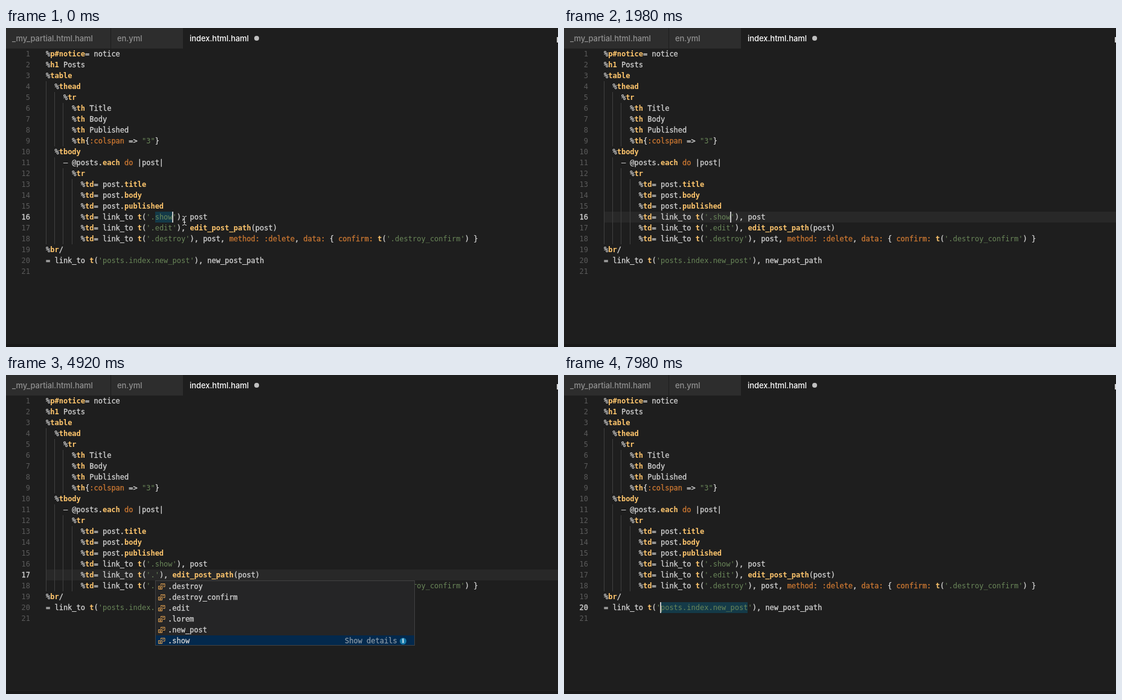
Write an HTML page that moves like this. It is 914 px wide and 528 px high and loops after 8 s.

```html
<!DOCTYPE html>
<html lang="en">
<head>
<meta charset="utf-8">
<title>Editor completion</title>
<style>
  html, body { margin: 0; width: 100%; height: 100%; overflow: hidden; background: #1e1e1e; }
  #stage { position: relative; width: 914px; height: 528px; overflow: hidden; background: #1e1e1e;
    color: #d4d4d4; font: 12px/18px "DejaVu Sans Mono", monospace; white-space: pre; }
  #stage div, #stage svg { position: absolute; }
  .tab { top: 0; height: 34px; background: #2d2d2d; color: #919191; box-sizing: border-box;
    padding-left: 10px; font: 500 13px/34px Inter, sans-serif; letter-spacing: -.05px; }
  .tab.active { background: #1e1e1e; color: #fff; }
  .dot { left: 411px; top: 13px; width: 8px; height: 8px; border-radius: 50%; background: #c0c0c0; }
  .edge { left: 912px; top: 15px; width: 2px; height: 9px; background: #d0d0d0; }
  .foot { left: 0; top: 523px; width: 914px; height: 5px; background: #191919; }
  #code { left: 0; top: 0; }
  .num { left: 0; width: 40px; text-align: right; color: #5a5a5a; }
  .num.on { color: #d0d0d0; -webkit-text-stroke: .3px; }
  .line { left: 66px; -webkit-text-stroke: .3px; }
  .guide { width: 1px; height: 18px; background: #404040; }
  .fn { color: #ffc66d; font-weight: bold; -webkit-text-stroke: 0; }
  .key { color: #cc7832; }
  .str { color: #6a8759; -webkit-text-stroke: 0; }
  #band { left: 66px; width: 848px; height: 18px; background: #282828; }
  #sel, #twin { height: 18px; background: #143a48; }
  #twin { background: #1c2b32; }
  #caret { width: 2px; height: 18px; background: #c4c4c4; }
  #popup { width: 430px; box-sizing: border-box; border: 1px solid #424242; background: #252526; overflow: hidden; }
  .item { left: 0; width: 100%; height: 18px; -webkit-text-stroke: .3px; }
  .item.on { background: #03294d; }
  .item svg { left: 3px; top: 2px; }
  .label { left: 20px; }
  .label b { color: #1a9bfc; }
  .more { left: 313px; color: #8796a3; }
  .info { left: 404px; top: 4px; width: 11px; height: 11px; border-radius: 50%; background: #1679a8;
    color: #cfe6f2; font: bold 9px/11px "DejaVu Serif", "Noto Serif", serif; text-align: center; }
</style>
</head>
<body>
<div id="stage">
  <div class="tab" style="left:0;width:173px">_my_partial.html.haml</div>
  <div class="tab" style="left:174px;width:119px">en.yml</div>
  <div class="tab active" style="left:294px;width:146px">index.html.haml</div>
  <div class="dot"></div>
  <div class="edge"></div>
  <div class="foot"></div>
  <div id="band"></div>
  <div id="sel"></div>
  <div id="twin"></div>
  <div id="code"></div>
  <div id="caret"></div>
  <div id="popup"></div>
  <svg id="mouse" style="left:290px;top:310px" width="12" height="18" fill="none" stroke="#e4e4e4">
    <path d="M2 1.5q3 0 3.5 2q.5-2 3.5-2M5.5 3v11M3.5 11.5h4M2 16.5q3 0 3.5-2q.5 2 3.5 2"/>
  </svg>
</div>
<script>
const LOOP = 8000, CHAR = 7.224, LEFT = 66, TOP = 34, ROW = 18;
const $ = id => document.getElementById(id);

const source = (show, edit) => `%p#notice= notice
%h1 Posts
%table
  %thead
    %tr
      %th Title
      %th Body
      %th Published
      %th{:colspan => "3"}
  %tbody
    – @posts.each do |post|
      %tr
        %td= post.title
        %td= post.body
        %td= post.published
        %td= link_to t('.${show}'), post
        %td= link_to t('.${edit}'), edit_post_path(post)
        %td= link_to t('.destroy'), post, method: :delete, data: { confirm: t('.destroy_confirm') }
%br/
= link_to t('posts.index.new_post'), new_post_path
`.split('\n');

const allItems = ['.destroy', '.destroy_confirm', '.edit', '.lorem', '.new_post', '.show'];

// Each step overrides the state left by the one before; "keep" leaves the caret blink running.
const steps = [
  { at: 0, row: 16, col: 29, show: 'show', edit: 'edit', sel: [25, 29], mouse: true },
  { at: 300, col: 25, show: '', sel: null, mouse: false },
  { at: 560, keep: true, items: allItems, pick: 0, popCol: 25 },
  { at: 1100, col: 26, show: 's', items: ['.show'], popCol: 26 },
  { at: 1640, col: 29, show: 'show', items: null },
  { at: 2100, row: 17 },
  { at: 2600, col: 25, sel: [25, 29], twin: true },
  { at: 3400, edit: '', sel: null, twin: false },
  { at: 3700, keep: true, items: allItems, pick: 5, popCol: 25 },
  { at: 5060, col: 26, edit: 'e', items: ['.edit'], pick: 0, popCol: 26 },
  { at: 5400, col: 29, edit: 'edit', items: null },
  { at: 5900, row: 18 },
  { at: 6020, row: 19, col: 5 },
  { at: 6140, row: 20, col: 29 },
  { at: 6900, col: 33 },
  { at: 7250, col: 25, sel: [25, 33] },
  { at: 7450, col: 19, sel: [19, 33] },
  { at: 7650, col: 13, sel: [13, 33] }
];
const states = [];
for (const step of steps) {
  const prev = states.at(-1);
  states.push({ ...prev, ...step, blinkFrom: step.keep ? prev.blinkFrom : step.at });
}

const xOf = col => LEFT + col * CHAR;
const yOf = row => TOP + (row - 1) * ROW;
const token = /('[^']*'|"[^"]*")|(:colspan|:delete|\bdo\b|\b(?:method|data|confirm):)|((?<=%)[\w#]+|(?<=\.)\w+|\w+(?=\())/g;
const paint = text => text.replace(/>/g, '&gt;').replace(token, (word, str, key) =>
  `<span class="${str ? 'str' : key ? 'key' : 'fn'}">${word}</span>`);

function place(el, visible, row, from, to) {
  el.style.display = visible ? 'block' : 'none';
  el.style.top = yOf(row) + 'px';
  if (from !== undefined) el.style.left = xOf(from) + 'px';
  if (to !== undefined) el.style.width = (to - from) * CHAR + 'px';
}

function lineHtml(text, i, activeRow) {
  const top = `top:${yOf(i + 1)}px`;
  const indent = text.match(/^ */)[0].length;
  let html = `<div class="num${i + 1 === activeRow ? ' on' : ''}" style="${top}">${i + 1}</div>`;
  for (let col = 0; col < indent; col += 2)
    html += `<div class="guide" style="${top};left:${Math.floor(xOf(col))}px"></div>`;
  return html + `<div class="line" style="${top}">${paint(text)}</div>`;
}

const icon = `<svg width="14" height="14" fill="none" stroke="#e0a050">
  <path d="M5.5 5V2.5h6.500v5h-3M1.500 6.500h6v5h-6zM3 8.500h3M3 10h3M7.500 4.500h3"/></svg>`;

function itemHtml(name, i, s) {
  const on = i === s.pick;
  const label = s.items.length === 1 ? `.<b>${name[1]}</b>${name.slice(2)}` : name;
  return `<div class="item${on ? ' on' : ''}" style="top:${i * ROW}px">${icon}<div class="label">${label}</div>` +
    (on ? '<div class="more">Show details</div><div class="info">i</div>' : '') + '</div>';
}

function render(s) {
  $('code').innerHTML = source(s.show, s.edit).map((text, i) => lineHtml(text, i, s.row)).join('');
  place($('band'), !s.sel, s.row);
  place($('sel'), s.sel, s.row, ...(s.sel || []));
  place($('twin'), s.twin, s.row, 33, 37);
  $('caret').style.left = Math.round(xOf(s.col) - .5) + 'px';
  $('caret').style.top = yOf(s.row) + 'px';
  $('mouse').style.display = s.mouse ? 'block' : 'none';
  const popup = $('popup');
  popup.style.display = s.items ? 'block' : 'none';
  if (s.items) {
    popup.style.left = Math.round(xOf(s.popCol)) + 'px';
    popup.style.top = yOf(s.row + 1) + 'px';
    popup.style.height = s.items.length * ROW + 'px';
    popup.innerHTML = s.items.map((name, i) => itemHtml(name, i, s)).join('');
  }
}

let shown;
const start = performance.now();
function tick() {
  const t = (performance.now() - start) % LOOP;
  const s = states.findLast(state => state.at <= t);
  if (s !== shown) render(shown = s);
  $('caret').style.visibility = (t - s.blinkFrom) % 1000 < 500 ? 'visible' : 'hidden';
  requestAnimationFrame(tick);
}
tick();
</script>
</body>
</html>
```
